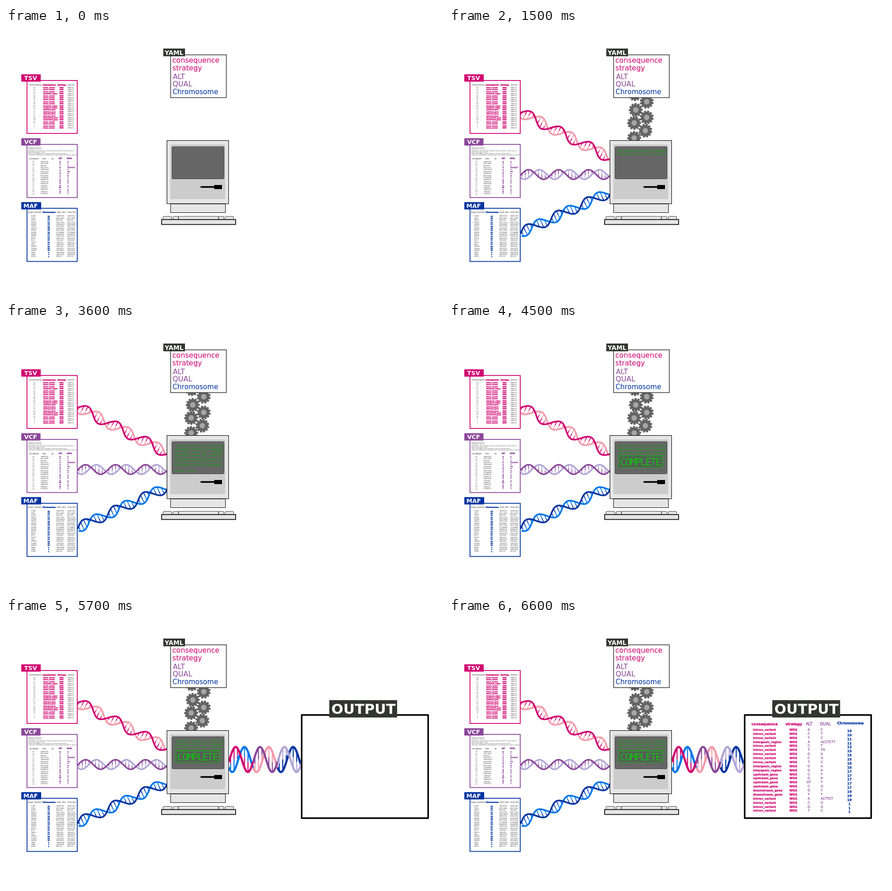
These frames come from a looping animation (957 px wide and 585 px high, 9.9 s). An HTML page:

```html
<!DOCTYPE html>
<html lang="en">
<head>
<meta charset="utf-8">
<title>Merging tables</title>
<style>
  html, body { margin: 0; width: 100%; height: 100%; overflow: hidden; background: #fff; }
  svg { display: block; width: 957px; height: 585px; font-family: "DejaVu Sans", sans-serif; }
  .b { font-weight: bold; }
  .mono { font-family: "DejaVu Sans Mono", monospace; }
  .tight { letter-spacing: -2px; }
</style>
</head>
<body>
<svg id="stage" viewBox="0 0 957 585"></svg>
<script>
const LOOP = 9900, TICK = 300;
const PINK = '#d0006f', ROSE = '#f29aab', PURPLE = '#8b4799', LILAC = '#b1a5d5',
      BLUE = '#0033a0', SKY = '#0075ea', DARK = '#333532', GREEN = '#1c9c1c';
const stage = document.getElementById('stage');
const timed = [];

function add(tag, attrs, parent = stage) {
  const el = document.createElementNS('http://www.w3.org/2000/svg', tag);
  for (const k in attrs) el.setAttribute(k, attrs[k]);
  return parent.appendChild(el);
}
const rect = (x, y, w, h, fill, stroke = 'none', sw = 1, parent = stage, rx = 0) =>
  add('rect', { x, y, width: w, height: h, fill, stroke, 'stroke-width': sw, rx }, parent);

function text(str, x, y, size, fill, { bold, anchor = 'start', parent = stage, cls = '', ink = 0 } = {}) {
  const t = add('text', { x, y, fill, 'font-size': size, 'text-anchor': anchor }, parent);
  t.setAttribute('class', (bold ? 'b ' : '') + cls);
  if (ink) {
    t.setAttribute('stroke', fill);
    t.setAttribute('stroke-width', size * ink);
  }
  t.textContent = str;
}

// Group shown from tick `from` until tick `to`.
function during(from, to = Infinity) {
  const el = add('g', {});
  timed.push({ el, from, to });
  return el;
}

// --- Data ---
const rep = (n, v) => Array(n).fill(v);
const chrom = '10 10 11 11 12 15 15 15 16 16 17 17 17 17 17 19 19 19 1 1 1'.split(' ');
const intron = 'Intron_variant', region = 'Intergenic_region';
const effect = [...rep(3, intron), region, ...rep(5, intron), ...rep(2, region),
  ...rep(4, 'upstream_gene'), ...rep(2, 'downstream_gene'), ...rep(4, intron)];
const alt = 'A C T A C T G C T G G C G GT C G T A C G T'.split(' ');
const qual = 'C T C ACCTCTT T TG A G C A A T A T G T T ACTTCT G A C'.split(' ');
const pos = ('16987292 89711900 605169 92517753 109526837 28447318 91295053 89727484 57780846 ' +
  '80490219 19284374 39041356 7162030 7462433 76682576 1084344 13476272 36558853 ' +
  '19493349 19493349 981116').split(' ');
const genes = ('CUBN PTEN PHRF1 MED17 ALKBH HERC2 MESDC NTRK3 KATNB ZNF48 MAPK7 KRT20 ELP5 TNFSF ' +
  'GAA HMHA1 CACNA WDR62 UBR4 UBR4 AGRN').split(' ');

function column(values, x, y, pitch, size, fill, opt) {
  values.forEach((v, i) => text(v, x, y + i * pitch, size, fill, opt));
}

// --- Helices ---
// Two cosine strands along a slanted axis; one piece per entry of `looks`.
const PEAKS = [0.28, 0.64];
function helix(x0, y0, x1, y1, amp, looks, start, width, rungs) {
  const len = Math.hypot(x1 - x0, y1 - y0), ux = (x1 - x0) / len, uy = (y1 - y0) / len;
  const piece = len / 3;
  const point = (s, peak) => {
    const off = -amp * Math.cos(2 * Math.PI * (s / piece - peak));
    return [x0 + ux * s - uy * off, y0 + uy * s + ux * off];
  };
  looks.forEach(([ca, cb], i) => {
    const g = during(start + i);
    for (let k = 0; k < rungs; k++) {
      const s = (i + (k + 0.5) / rungs) * piece;
      const a = point(s, PEAKS[0]), b = point(s, PEAKS[1]);
      const m = [(a[0] + b[0]) / 2, (a[1] + b[1]) / 2];
      add('path', { d: `M${a}L${m}`, stroke: ca, 'stroke-width': width * 0.48 }, g);
      add('path', { d: `M${b}L${m}`, stroke: cb, 'stroke-width': width * 0.48 }, g);
    }
    [cb, ca].forEach((stroke, j) => {
      const pts = [];
      for (let k = 0; k <= 40; k++) pts.push(point((i + k / 40) * piece, PEAKS[1 - j]));
      add('path', { d: 'M' + pts.join('L'), fill: 'none', stroke, 'stroke-width': width }, g);
    });
  });
}
helix(156, 184, 353, 285, 11.5, rep(3, [PINK, ROSE]), 1, 3.6, 9);
helix(156, 321, 353, 321, 10.5, rep(3, [PURPLE, LILAC]), 1, 3.4, 9);
helix(156, 449, 353, 360, 11, rep(3, [BLUE, SKY]), 1, 3.6, 9);
helix(488, 310, 648, 310, 27.5, [[PINK, SKY], [PURPLE, ROSE], [LILAC, BLUE]], 16, 4.6, 7);

// --- Gears ---
function gear(cx, cy, at, turn) {
  const g = during(at), n = 12, pts = [];
  for (let i = 0; i < n; i++) {
    [[-0.5, 11.8], [-0.26, 15], [0.2, 15], [0.3, 11.8]].forEach(([o, r]) => {
      const a = (i + o) / n * 2 * Math.PI + turn;
      pts.push([cx + r * Math.cos(a), cy + r * Math.sin(a)].map(v => v.toFixed(2)));
    });
  }
  add('path', { d: 'M' + pts.join('L') + 'Z', fill: '#636363', stroke: '#555', 'stroke-width': 0.5 }, g);
  add('circle', { cx, cy, r: 6, fill: '#a6a6a6', stroke: '#858585', 'stroke-width': 0.8 }, g);
}
[[407, 145, 1], [433, 161.5, 1], [409, 179.5, 2], [433, 196, 2],
 [405.5, 208, 3], [430, 225, 3], [405.5, 241, 3]].forEach(([x, y, at], i) => gear(x, y, at, i * 0.26));

// --- Input tables ---
function sheet(label, y, w, h, color) {
  rect(46, y, 110, h, '#fff', color, 1.8);
  rect(33.5, y - 13.5, w, 16, color);
  text(label, 54, y - 0.8, 13, '#fff', { bold: 1, anchor: 'middle' });
}
const mid = { anchor: 'middle' }, boldMid = { bold: 1, anchor: 'middle' };
const heavy = { bold: 1, ink: 0.13 }, heavyMid = { ...heavy, anchor: 'middle' };
const INK = '#222', ROW = 4.4;

sheet('TSV', 115, 42.5, 116, PINK);
text('Chromosome', 64, 126, 4.3, INK, mid);
text('consequence', 94.5, 126, 3.95, PINK, heavyMid);
text('strategy', 122, 126, 3.85, PINK, heavyMid);
text('version', 142, 126, 4.3, INK, mid);
column(chrom, 62, 132, ROW, 3.4, INK, mid);
column(effect, 81.5, 132, ROW, 3.15, PINK, heavy);
column(rep(21, 'WGS'), 121.5, 132, ROW, 3.3, PINK, heavyMid);
column(rep(21, 'GRCh37'), 142, 131.6, ROW, 3.4, INK, mid);

sheet('VCF', 255, 42, 116.5, PURPLE);
['##fileformat=VCFv4.2', '##fileDate=20191127',
 '##FORMAT=<ID=AD,Number=R,Type=Integer,Description="Allelic Depths of',
 'REF and ALT alleles in order', 'listed">##FORMAT=<ID=GT,Number=1,Type=String,Description=',
 '"Genotype">##FORMAT=<ID=DP,Number=1,Type=Integer,Description="Depth">'
].forEach((s, i) => text(s, 49, 263 + i * 3.25, 2.55, INK));
text('#CHROM', 61, 287.5, 4.3, INK, mid);
text('POS', 83.5, 287.5, 4.3, INK, mid);
text('ID', 102, 287.5, 4.3, INK, mid);
text('ALT', 119, 287.2, 3.95, PURPLE, heavyMid);
text('QUAL', 139, 287.2, 3.95, PURPLE, heavyMid);
column(chrom.slice(0, 17), 60, 294.3, ROW, 3.4, INK, mid);
column(pos.slice(0, 17), 75.5, 293.7, ROW, 3.4, INK);
column(rep(17, '.'), 102.5, 293.7, ROW, 3.4, INK, mid);
column(alt.slice(0, 17), 118.5, 293.9, ROW, 3.6, PURPLE, heavyMid);
column(qual.slice(0, 17), 134.5, 293.9, ROW, 3.3, PURPLE, heavy);

sheet('MAF', 395, 43.5, 116.5, BLUE);
text('Hugo_Symbol', 63, 405.4, 4.35, INK, mid);
text('Chromosome', 94.3, 405.4, 3.88, BLUE, heavyMid);
text('Start_Pos', 121, 405.4, 4.3, INK, mid);
text('End_Pos', 144, 405.4, 4.3, INK, mid);
column(genes, 55, 413.4, ROW, 3.4, INK);
column(chrom, 93.5, 413.6, ROW, 3.5, BLUE, heavyMid);
column(pos, 110, 413.4, ROW, 3.45, INK);
column(pos, 134, 413.4, ROW, 3.45, INK);

// --- YAML card ---
rect(360.5, 58.8, 122, 93.7, '#fff', DARK, 1.5);
rect(344.5, 45, 47.5, 17, DARK);
text('YAML', 368, 59, 13.5, '#fff', boldMid);
text('consequence', 364.3, 76.4, 15.6, PINK);
text('strategy', 364.3, 93.2, 15.6, PINK);
text('ALT', 365.6, 112, 15.4, PURPLE);
text('QUAL', 364.8, 128.3, 15.6, PURPLE);
text('Chromosome', 364.8, 145, 15.05, BLUE);

// --- Computer ---
const SHELL = '#e6e6e6';
rect(360.5, 385.5, 120, 19, SHELL, '#000');
rect(352.5, 246.5, 135, 138.5, SHELL, '#000', 1.1);
rect(360, 255, 120, 120, '#ccc', 'none', 1, stage, 2);
rect(363.5, 260, 114, 70.5, '#666', '#444', 1, stage, 2);
rect(426, 346.5, 32, 3.6, '#000');
rect(456, 344, 17, 9, '#000');
rect(378, 412.5, 87, 7, SHELL, '#222', 0.8);
[[344, 19], [366, 11.5], [465.5, 11.5], [480, 18.5]].forEach(([x, w]) =>
  rect(x, 412.8, w, 7, SHELL, '#222', 0.9, stage, 1.5));
rect(340.8, 419.7, 162, 10.8, SHELL, '#000', 1.7);

['read_table("variants.tsv",columns=4)', 'read_table("variants.vcf",columns=5)',
 'read_table("variants.maf",columns=4)', 'load_names("columns.yaml",number=5)',
 'select(consequence,strategy,ALT,all)', 'select(QUAL,Chromosome,from=tables)',
 'merge(tables,rows=21,by=Chromosome)'
].forEach((s, i) => text(s, 369, 271.4 + i * 6.85, 4.95, GREEN,
  { cls: 'mono', ink: 0.05, parent: during(4 + i) }));

[['CREATE', 367], ['OUTPUT', 394], ['.........', 423], ['............', 441.5]].forEach(([s, x], i) =>
  text(s, x, 326, 6.3, GREEN, { parent: during(11 + i, 15) }));

const done = during(15);
rect(372.5, 291.5, 94, 25, '#575b57', '#0db80d', 1.1, done);
text('COMPLETE', 419, 312, 21.6, '#0fc40f', { anchor: 'middle', cls: 'mono tight', parent: done });

// --- Output table ---
const out = during(19);
add('rect', { x: 647.5, y: 212.5, width: 277, height: 226, fill: '#fff', stroke: '#000',
  'stroke-width': 3.4, 'stroke-linejoin': 'round' }, out);
rect(708, 180, 148.5, 38, DARK, 'none', 1, out);
text('OUTPUT', 783, 210.3, 30.8, '#fff', { ...boldMid, parent: out });

const strong = { bold: 1, ink: 0.045 }, strongMid = { ...strong, anchor: 'middle' };
const firm = { ink: 0.035 }, firmMid = { ...firm, anchor: 'middle' };
const head = during(20);
text('consequence', 662.5, 234.5, 7.8, PINK, { ...strong, parent: head });
text('strategy', 755, 234.5, 7.7, PINK, { ...strongMid, parent: head });
text('ALT', 788.6, 235, 8.5, PURPLE, { ...firmMid, parent: head });
text('QUAL', 824, 235, 8.8, PURPLE, { ...firmMid, parent: head });
text('Chromosome', 879, 233, 7.9, BLUE, { ...strongMid, parent: head });

[[0, 10, 21], [10, 21, 22]].forEach(([a, b, at]) => {
  const parent = during(at), y = 247 + a * 8.87;
  const put = (list, x, dy, size, fill, opt) =>
    column(list.slice(a, b), x, y + dy, 8.87, size, fill, { ...opt, parent });
  put(effect, 666, 0, 6.25, PINK, strong);
  put(rep(21, 'WGS'), 754, 0, 6.5, PINK, strongMid);
  put(alt, 788, 0, 7.1, PURPLE, firmMid);
  put(qual, 814, 0, 7.1, PURPLE, firm);
  put(chrom, 877, 3, 7.1, BLUE, strongMid);
});

// --- Playback ---
function draw() {
  const tick = Math.floor(performance.now() % LOOP / TICK);
  for (const { el, from, to } of timed)
    el.setAttribute('visibility', tick >= from && tick < to ? 'visible' : 'hidden');
  requestAnimationFrame(draw);
}
draw();
</script>
</body>
</html>
```
